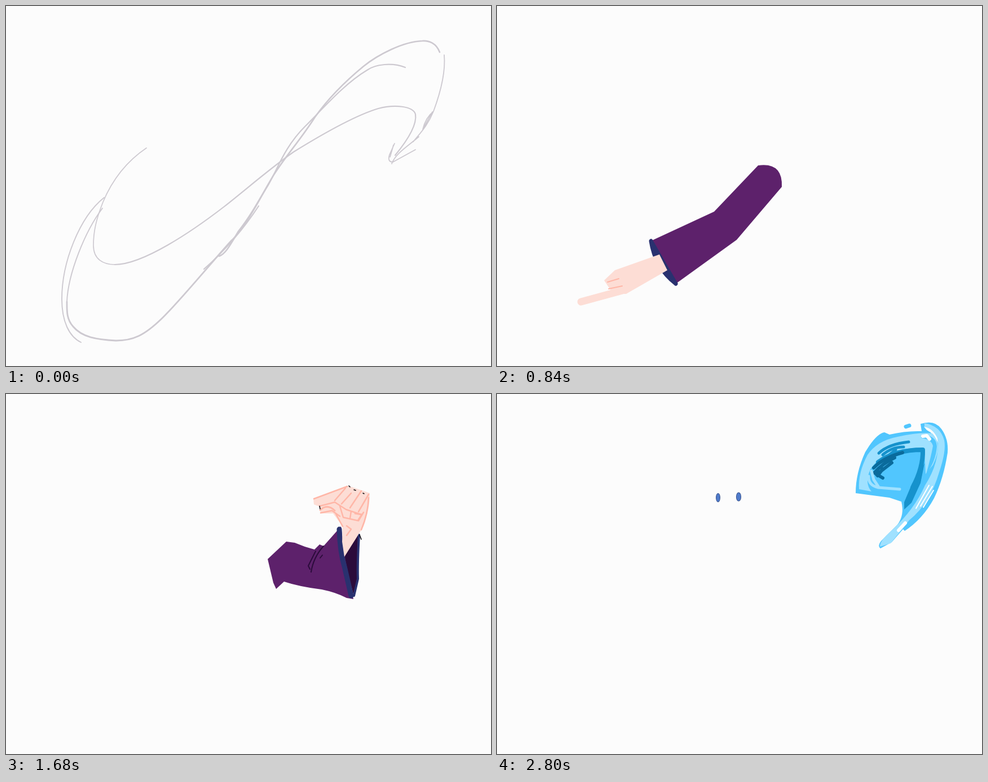
Write an HTML page with a canvas that moves like this. It is 860 px wide and 639 px high and loops after 2.94 s.

```html
<!DOCTYPE html>
<html lang="en">
<meta charset="utf-8">
<title>Water spell</title>
<style>
html, body { margin: 0; height: 100%; overflow: hidden; background: #fcfcfc }
canvas { display: block }
</style>
<canvas width="860" height="639"></canvas>
<script>
const ctx = document.querySelector('canvas').getContext('2d');
ctx.lineCap = ctx.lineJoin = 'round';

const BLACK = '#0b080d', COAT = '#4e2359', SLEEVE = '#5d216b', DARK = '#2b0b3b', TRIM = '#29316f',
  SKIN = '#fdddd5', BLUSH = '#ffb6a7', HAIR = '#fd98b0', PLUM = '#8c2c4c', CREAM = '#efe0b8', GOLD = '#cfa23e',
  WATER = '#51c6fe', PALE = '#9fe1ff', MID = '#1692cc', DEEP = '#0a6b9c', WHITE = '#fff', PAPER = '#fcfcfc';

let inkOnly = false;

function line(color, width, d) {
  ctx.strokeStyle = inkOnly ? BLACK : color;
  ctx.lineWidth = inkOnly ? 2 : width;
  ctx.stroke(new Path2D(d));
}

function fill(color, d) {
  if (inkOnly) return line(BLACK, 2, d);
  ctx.fillStyle = color;
  ctx.fill(new Path2D(d));
}

const oval = (color, x, y, rx, ry = rx) =>
  fill(color, `M${x - rx},${y}a${rx},${ry} 0 1 0 ${2 * rx},0a${rx},${ry} 0 1 0 ${-2 * rx},0`);

function guide() {
  const grey = '#cdc9d0';
  line(grey, 1.7, 'M249,252C212,277 187,312 172,348C160,378 155,400 155,425C155,450 173,459 193,459');
  line(grey, 2.2, 'M193,459C243,459 330,400 387,356C430,322 470,287 510,259C560,228 620,194 660,182C690,174 722,178 726,192C729,210 713,237 690,265');
  line(grey, 2.6, 'M769,82C763,66 750,61 738,62C705,63 660,86 634,107C600,135 570,166 548,197C522,238 496,266 474,301C452,338 436,370 412,400C400,420 390,440 378,444');
  line(grey, 2.2, 'M708,109C685,100 655,103 640,114C600,138 564,180 530,214C494,250 482,288 465,318C445,350 430,385 400,416');
  line(grey, 2.8, 'M400,416C360,460 310,522 276,555C245,585 225,594 195,594C160,592 135,588 119,569C107,556 108,540 108,525');
  line(grey, 1.9, 'M108,525C110,475 140,400 171,359M174,340C130,375 99,455 99,520C99,560 112,587 133,597');
  line(grey, 2.2, 'M448,355C420,398 385,437 351,467');
  line(grey, 1.8, 'M777,87C780,120 768,160 758,187C748,212 735,225 722,241M732,232C715,247 690,262 684,280M689,244L680,264Q676,277 686,277L726,255M758,187Q744,198 739,219L756,188M681,268L687,247');
}

function coat() {
  fill(SKIN, 'M191,618L240,562L268,590L255,621L205,620Z');
  line(BLUSH, 2, 'M192,617L229,582M245,570Q245,590 234,598Q228,610 240,608L252,604L262,590M208,616L217,612');
  line(BLACK, 1.5, 'M223,581L229,574M238,566L241,561M264,598L255,620');
  fill(COAT, 'M366,270Q370,250 385,241L410,250L430,262L462,243L488,216Q508,207 524,208L530,220Q545,238 546,254Q546,266 537,270L508,284L512,297Q502,330 500,350Q494,380 498,408L519,495L530,545L545,596L558,639L302,639L308,612Q275,605 234,551L237,533Q255,521 262,508Q310,445 328,408Q350,360 370,287Z');
  fill(TRIM, 'M237,533L249,529Q272,568 310,591L306,613Q270,605 233,549Z');
  fill(TRIM, 'M382,246L394,243L410,268L402,282Q386,270 382,246ZM397,335L377,428L366,490L357,560L348,639H331Q348,575 355,500L363,450L375,400L386,345Z');
  fill(TRIM, 'M498,214L524,209L530,224Q478,247 430,285L424,340L418,400Q424,480 436,560L450,639H425L419,520L411,450L415,330L426,273L464,246Z');
  fill('#40292c', 'M374,452L412,457L419,520L424,639H348L357,560L364,490Z');
  fill(CREAM, 'M407,252L425,266L461,247L427,279L418,300L415,340L409,429L376,426L391,350L402,300Z');
  fill(BLACK, 'M375,425L411,428L413,458L373,450Z');
  fill('#704a25', 'M376,431L410,433L409,450L375,446Z');
  line(GOLD, 4, 'M406,433L389,431L386,445L406,448M396,440L405,441');
  line(BLACK, 2, 'M358,403L340,465Q326,520 309,596M415,300L410,400M364,500L379,542M415,512L380,547L388,570L394,621M414,524L382,547M498,410L507,455L519,497M408,257L424,272L458,249M424,272L428,280M405,275L410,285L423,272');
  line(DARK, 3, 'M379,290Q368,350 360,400L348,460M317,560L308,600M501,415L518,494');
  line(BLACK, 3, 'M387,241Q364,256 368,272L383,287M527,210L532,226L545,242L544,262M374,286L382,289M408,274Q402,254 390,242M428,281Q470,247 524,223M464,244L488,217L524,208');
  oval(BLACK, 481, 392, 1.5);
  fill(GOLD, 'M424,300Q417,286 431,281Q446,276 449,287Q449,301 438,307ZM390,304Q388,283 400,281Q407,286 402,306Z');
  line(GOLD, 6, 'M391,300L383,312Q378,327 393,324Q420,321 435,298');
  line(GOLD, 3.5, 'M386,312L383,338M391,310L387,340M397,309L392,342M431,306L430,343M435,304L436,344M439,304L442,344');
}

function head() {
  fill(SKIN, 'M414,244L450,222L461,246L427,264Z');
  fill(SKIN, 'M376,170L377,205Q382,235 402,246Q415,252 436,238L457,206L455,158L390,158Z');
  line(BLUSH, 2, 'M402,176L400,190Q386,200 391,207L399,206M440,239L453,242M440,247L452,249M416,246Q430,242 437,236');
  line('#f28c85', 2, 'M394,223Q408,229 424,219');
  oval(WHITE, 389, 183, 8, 9);
  oval(WHITE, 425, 182, 13, 10);
  fill(HAIR, 'M357,142Q358,124 378,113L415,113Q440,104 462,110L491,126Q499,150 490,165L477,203L487,210L480,215L487,224L472,228L478,236L457,237L450,229L444,230Q452,215 452,204L433,207Q444,190 440,172L422,169L400,172L378,170L376,188L372,204L364,207L371,192L374,177L358,163Z');
  line(PLUM, 3, 'M378,183Q386,172 395,176M411,177Q425,166 435,177L441,181M377,178L380,188M434,173L438,186');
  line('#cb5d7c', 2.5, 'M376,150Q386,166 400,170M392,149Q402,166 414,167M415,158Q433,154 440,165M418,163L440,170L452,160M362,165L376,176');
  fill('#d07375', 'M455,188L502,156Q499,178 487,191L475,208L456,211Z');
  line('#ffc9c1', 4, 'M458,183L499,158M460,187L480,188M459,197L477,204');
  line('#cb5d7c', 1, 'M472,225L486,224M458,236L477,236');
  oval('#b9d5e5', 472, 129, 12, 10);
  line('#4e7297', 1.6, 'M474,128Q470,124 468,129Q470,136 478,134Q485,126 477,122Q468,121 464,128');
  const star = 'M456,128L465,140L480,136L474,149L484,157L471,158L464,168L458,158L445,152L457,146Z';
  fill('#faaf4a', star);
  line('#faaf4a', 3, star);
  oval('#b65f25', 465, 149, 4);
  for (const [x, y] of [[458, 134], [475, 139], [452, 151], [464, 163], [478, 155]]) oval('#b65f25', x, y, 1.5);
}

function character(ink) {
  inkOnly = ink;
  coat();
  head();
  inkOnly = false;
}

// Sleeve from the shoulder over elbow and wrist, with a finger reaching to the tip.
function arm(sx, sy, ex, ey, wx, wy, tx, ty) {
  const at = (x, y, angle, r) => [x + r * Math.cos(angle), y + r * Math.sin(angle)].map(Math.round).join();
  const a = Math.atan2(ey - sy, ex - sx), b = Math.atan2(wy - ey, wx - ex), h = Math.atan2(ty - wy, tx - wx);
  const q = Math.PI / 2, mid = (a + b) / 2;
  const up = at(wx, wy, b - q, 44), down = at(wx, wy, b + q, 44), lip = at(wx, wy, b, 18);
  fill(SLEEVE, `M${at(sx, sy, a - q, 28)}Q${at(sx, sy, a + Math.PI, 34)} ${at(sx, sy, a + q, 28)}L${at(ex, ey, mid + q, 32)}L${down}L${up}L${at(ex, ey, mid - q, 32)}Z`);
  fill(DARK, `M${up}Q${lip} ${down}Z`);
  line(TRIM, 7, `M${up}L${down}Q${lip} ${up}`);
  const mx = (wx + tx) / 2, my = (wy + ty) / 2;
  fill(SKIN, `M${at(wx, wy, h - q, 15)}L${at(mx, my, h - q, 22)}L${at(mx, my, h - .5, 24)}L${at(mx, my, h + .6, 30)}L${at(mx, my, h + q, 25)}L${at(wx, wy, h + q, 15)}Z`);
  line(SKIN, 13, `M${at(mx, my, h - q, 14)}L${at(tx, ty, h, -6)}`);
  line(BLUSH, 2, `M${at(mx, my, h - q, 6)}L${at(mx, my, h, 24)}M${at(mx, my, h + q, 8)}L${at(mx, my, h + .5, 24)}`);
}

function armPointing() {
  fill(DARK, 'M318,373L300,418L295,432L323,472L331,380Z');
  fill(SLEEVE, 'M463,272Q485,266 500,275Q510,285 519,298L497,347L487,366L479,349L465,369L430,412L332,466L334,372Q390,364 417,352Q432,340 440,320Z');
  line(SLEEVE, 3, 'M332,370Q350,363 380,362L417,352M516,300L496,347');
  line(PAPER, 2, 'M334,371L356,367M461,296L467,288M508,308L499,335');
  line(TRIM, 8, 'M309,374L325,371Q333,380 332,400Q330,440 324,473Q305,460 297,432');
  fill(SKIN, 'M229,404L302,375Q325,377 329,390L327,404L316,402Q300,415 295,420L290,440L270,453L242,458L236,449L238,430L234,430Q225,472 214,492L202,495L205,478L227,416Z');
  line(BLUSH, 2.5, 'M234,421Q236,441 250,451M245,419Q250,440 260,449M257,417Q263,438 274,448M277,431L291,428L284,441L281,421M316,402L318,393');
  fill(BLUSH, 'M235,449L245,458L237,458Z');
  line(BLACK, 1.5, 'M473,265L498,259M474,264L494,263L488,267M428,342L436,318M247,457L263,454M215,491Q223,487 227,469M228,405L231,403M271,387L282,383');
  fill(BLACK, 'M433,326L437,316L437,324Z');
}

function armRaised() {
  fill(DARK, 'M596,280L626,247L625,320L616,356Z');
  fill(SLEEVE, 'M464,293L497,262L512,264L530,271L547,276L556,267L563,270L594,235L601,290L616,364L604,362Q585,352 560,347Q520,342 493,333L479,346L474,335Z');
  line(DARK, 2, 'M563,270Q545,290 541,316M549,279L536,305L539,311M557,291L561,286');
  line(TRIM, 9, 'M591,240Q592,280 601,310L612,358');
  line(TRIM, 4, 'M626,250Q623,300 624,328L617,358');
  fill(SKIN, 'M545,186L607,163L631,171L645,176Q645,205 634,235L600,289L596,262L597,235L580,212L558,212L556,200L580,193L554,199L546,196Z');
  line(BLUSH, 2.5, 'M546,186L605,164M556,199L583,192L603,205L630,214M558,211L578,207L592,217M583,189L602,167M595,195L612,176M610,202L630,172M625,209L643,178M592,199L598,219L625,225L634,210M612,208L610,221M585,213L597,235M604,234L612,240L604,251M643,184Q642,212 630,241');
  line(BLUSH, 3, 'M557,206Q570,194 583,207M619,212L631,214L625,223');
  line(BLACK, 1.5, 'M608,163L610,165M617,170L620,171M633,176L635,177M556,199L557,204M627,250L630,258');
}

// Curved blade of water with half-thickness r at the bend.
function blade(color, x0, y0, cx, cy, x1, y1, r) {
  const len = Math.hypot(x1 - x0, y1 - y0), nx = (y1 - y0) / len * r, ny = (x0 - x1) / len * r;
  fill(color, `M${x0},${y0}Q${cx + nx},${cy + ny} ${x1},${y1}Q${cx - nx},${cy - ny} ${x0},${y0}Z`);
}

function ribbon(x0, y0, cx, cy, x1, y1, r) {
  const inner = (color, k, scale) => blade(color,
    x0 + (cx - x0) * k, y0 + (cy - y0) * k, cx, cy, x1 + (cx - x1) * k, y1 + (cy - y1) * k, r * scale);
  inner(WATER, 0, 1);
  inner(PALE, .12, .65);
  inner(MID, .18, .45);
  inner(DEEP, .3, .2);
  inner(WHITE, .36, .06);
}

function waterRising() {
  fill(WATER, 'M158,254L165,258L187,255Q172,285 174,314Q195,302 216,279L246,281L257,295L240,312Q218,333 212,356Q205,405 190,442Q172,482 155,489L147,490L131,499Q118,504 112,496Q104,484 103,455L107,405Q98,408 83,424L80,420L110,386Q120,350 132,322L138,311Q152,300 158,284Z');
  line(PALE, 7, 'M85,424Q84,436 88,449L98,451M92,436L98,442');
  line(WATER, 2, 'M81,423L85,445M94,455L102,450M92,433L98,441');
  fill(PALE, 'M136,322L156,304Q126,380 118,428Q122,465 147,482L136,487Q108,468 107,430Q110,378 136,322Z');
  fill(PALE, 'M164,300Q145,345 137,415L158,417Q174,385 178,340L197,312L166,335Z');
  fill(MID, 'M159,260L175,261Q168,275 164,290Q150,340 124,418L120,414Q128,370 137,345Q152,310 160,288ZM133,402Q122,438 138,458Q148,466 157,464L158,416L138,418Z');
  fill(DEEP, 'M168,286Q157,310 147,349L131,402L133,367Q146,320 168,286ZM138,418Q150,422 159,415Q157,443 145,450Q132,445 134,432Z');
  line(MID, 5, 'M196,317Q187,345 185,380M208,298L206,322');
  line(DEEP, 4, 'M211,296Q214,325 202,372M194,340L187,408');
  line(WHITE, 8, 'M164,324Q153,348 157,371Q159,380 166,373');
  line('#c9efff', 7, 'M147,362Q142,390 146,407M155,383L154,400');
  line(WHITE, 4, 'M200,385Q192,425 172,458M126,350L123,375M141,328L139,337M123,467Q132,480 144,484');
  line(PALE, 4, 'M235,304Q215,325 205,375M246,282L254,295');
  line(PAPER, 2, 'M237,306Q218,326 212,344');
  line(DEEP, 4, 'M217,281L222,286M225,285L231,296M233,283L240,297M243,283L246,290');
  line(MID, 3, 'M238,287L255,294');
  oval(PALE, 183, 321, 8, 10);
  oval(WHITE, 181, 318, 3, 4);
  line(MID, 3, 'M177,332Q184,336 190,329');
  oval(MID, 185, 277, 5, 6);
  oval(WATER, 138, 299, 4);
  for (const [x, y] of [[148, 457], [118, 494], [144, 440]]) oval(WHITE, x, y, 1.2);
}

function waterTwisting() {
  fill(WATER, 'M523,206Q525,218 519,229L526,232Q530,255 518,283Q500,305 475,320L432,347L409,377L372,425L370,440L354,475Q345,491 341,482L351,465L330,470L313,461Q312,435 330,408L362,376Q390,340 432,303L482,252L509,215Z');
  fill(PALE, 'M514,240L524,235Q531,260 513,283Q520,260 514,240ZM325,444Q350,455 352,430L348,455Q334,470 325,455Z');
  fill(MID, 'M435,315Q400,355 360,383Q340,405 336,428L350,420L355,433Q380,410 388,400L409,374L426,348L470,317L515,280L517,258L497,266L484,278Z');
  fill(WATER, 'M467,303L494,282L485,301L464,316Z');
  fill(DEEP, 'M483,269L466,284L446,313L460,304ZM420,338L397,353L382,375L399,365ZM460,310L440,324L429,343L453,322Z');
  line(PALE, 9, 'M510,228Q472,270 445,309L420,340Q385,375 361,439');
  line(WATER, 6, 'M434,311Q410,350 384,382');
  line(WHITE, 7, 'M513,244L519,238M342,433L337,432M361,439L365,428');
  line(WHITE, 3, 'M511,230Q490,249 474,276M374,413L386,391M339,429L346,421');
  line(DEEP, 3, 'M499,266L487,291M508,272L493,291');
  line(MID, 4, 'M388,400L410,371');
  line(WATER, 7, 'M528,178L533,173');
  oval(MID, 453, 281, 1.3);
}

function waterCresting() {
  fill(WATER, 'M636,176Q636,140 653,103L660,92Q675,70 687,68L696,72Q725,65 753,66L751,53Q776,45 788,62Q801,80 799,104Q792,150 775,185Q755,222 723,243L720,240L700,263L680,274Q674,270 681,261L710,232Q723,215 717,191L696,184Z');
  fill(PAPER, 'M757,58Q780,60 785,83L782,87Q775,70 762,64Z');
  fill(PALE, 'M642,169Q640,140 657,108Q674,83 710,76Q750,67 772,70Q791,90 773,126L760,142L758,101Q740,93 711,100Q675,112 662,134Q651,158 664,173Z');
  fill(PALE, 'M758,52Q786,56 793,82Q797,101 784,139Q768,194 731,224L698,265L679,271Q679,260 700,242Q740,205 759,162Q786,120 781,79Q774,62 758,58Z');
  fill(WATER, 'M752,73Q779,72 780,93Q778,120 761,142Q770,110 773,92Q770,80 752,78Z');
  line(MID, 8, 'M676,121Q705,99 755,99Q756,130 737,166');
  fill(MID, 'M758,123L751,158L735,193L722,205L722,192L736,159Z');
  line(MID, 5, 'M677,105Q694,89 730,85M684,108Q700,94 721,94M693,110L707,99');
  line(DEEP, 6, 'M668,131Q685,113 719,104M669,140Q684,123 705,113M673,143L700,122M675,145L684,133M679,146L684,149');
  line(PALE, 5, 'M659,146Q658,162 676,166L714,169M664,137L668,152L676,164');
  line(WHITE, 6, 'M755,75L762,74L767,80M712,242L724,229');
  line(WHITE, 2, 'M766,162L743,203M772,164L751,199M774,171L756,201');
  line(WATER, 7, 'M725,58L731,56');
}

const eyeX = [[385, 417], [387, 419], [389, 421], [390.5, 424], [391, 425], [392, 427], [392, 428.5]];

function eyes(i) {
  const [left, right] = eyeX[i];
  for (const x of [left, right]) {
    const y = (i == 3 ? 186 : 184) - (x == right ? 1.5 : 0);
    if (i == 3) {
      const d = `M${x - 3.5},${y + 6}Q${x - 3},${y - 7} ${x},${y - 7}Q${x + 4},${y - 4} ${x + 4},${y + 4}Z`;
      fill('#4f7bcb', d);
      line('#3a548f', 1, d);
    } else {
      oval('#3a548f', x, y, x == right ? 4.6 : 4, 8);
      oval('#4f7bcb', x, y, x == right ? 3.6 : 3, 7);
    }
  }
}

const water = [
  waterRising,
  () => ribbon(100, 370, 75, 660, 270, 590, 80),
  () => ribbon(126, 520, 210, 700, 400, 440, 60),
  waterTwisting,
  () => ribbon(335, 355, 500, 245, 620, 80, 60),
  () => ribbon(520, 275, 650, -20, 790, 110, 75),
  waterCresting
];

const scenes = [
  [0, guide],
  [350, () => character(true)],
  [560, () => character(false)],
  [840, () => arm(484, 302, 405, 390, 295, 455, 144, 528)],
  [980, () => arm(484, 302, 412, 378, 290, 410, 137, 470)],
  [1120, armPointing],
  [1260, () => arm(484, 302, 445, 375, 395, 415, 320, 476)],
  [1400, () => arm(484, 302, 415, 385, 510, 385, 598, 368)],
  [1540, () => arm(484, 302, 490, 370, 550, 320, 588, 232)],
  [1680, armRaised],
  [1820, () => arm(484, 312, 580, 225, 660, 155, 770, 55)],
  ...water.map((draw, i) => [1960 + 140 * i, () => { draw(); eyes(i); }])
];

function frame() {
  const t = performance.now() % 2940;
  ctx.fillStyle = PAPER;
  ctx.fillRect(0, 0, 860, 639);
  scenes.findLast(([start]) => start <= t)[1]();
  requestAnimationFrame(frame);
}
frame();
</script>
</html>
```
